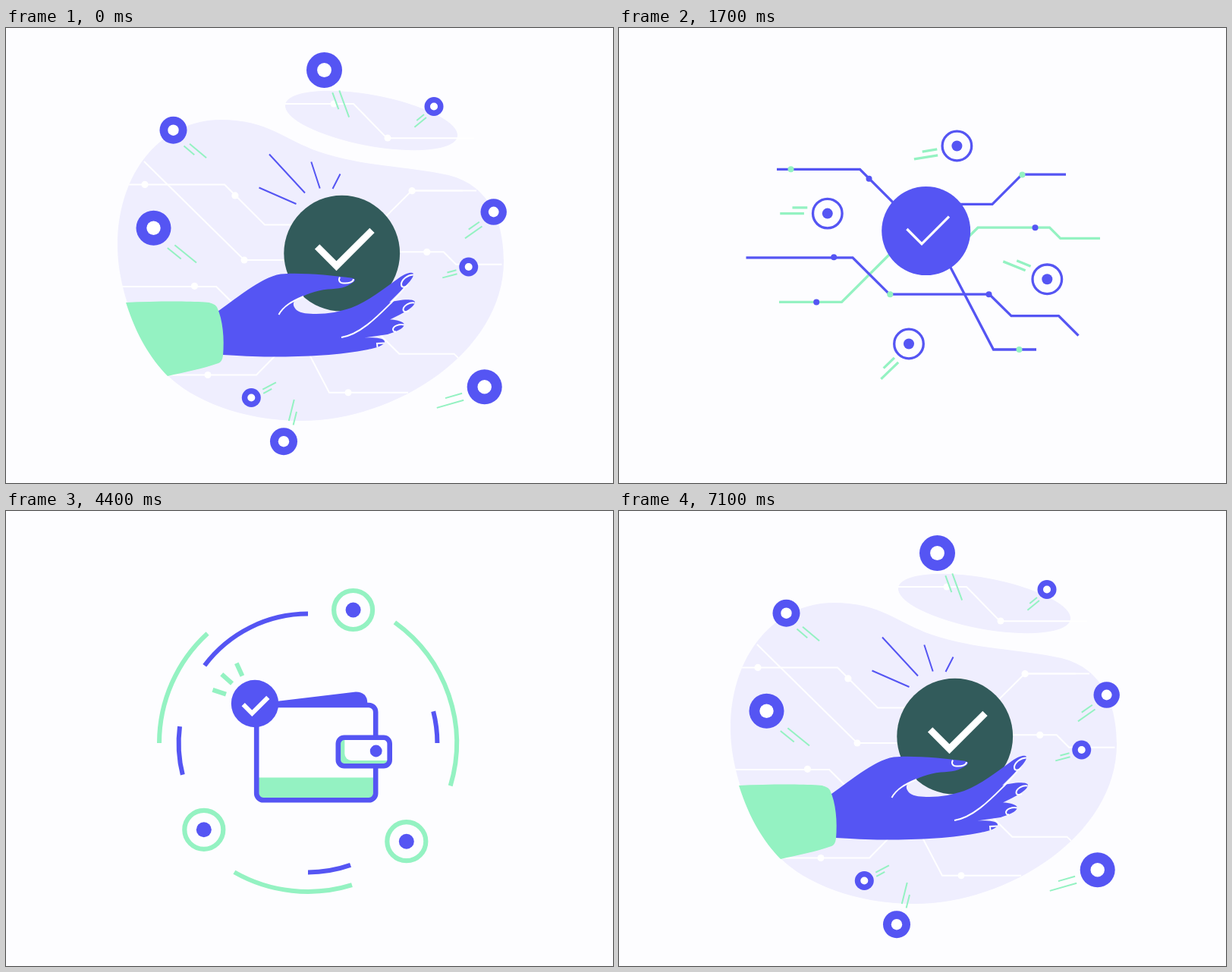
Animation, 800 px wide and 600 px high, one loop 8.1 s. Source, as an HTML page with a canvas:

```html
<!DOCTYPE html>
<html lang="en">
<head>
<meta charset="utf-8">
<title>Coins, network, wallet</title>
<style>
html, body { margin: 0; width: 100%; height: 100%; overflow: hidden; background: #fdfdff; }
canvas { display: block; }
</style>
</head>
<body>
<canvas id="stage" width="800" height="600"></canvas>
<script>
const W = 800, H = 600, DEG = Math.PI / 180;
const PAPER = '#fdfdff', BLUE = '#5555f3', GREEN = '#94f2c2',
      HAZE = '#efeefe', DARK = '#325b5b', WHITE = '#fff';

let g;

function scene(draw) {
  const layer = document.createElement('canvas');
  layer.width = W;
  layer.height = H;
  g = layer.getContext('2d');
  g.fillStyle = PAPER;
  g.fillRect(0, 0, W, H);
  draw();
  return layer;
}

function fill(color, d) {
  g.fillStyle = color;
  g.fill(new Path2D(d));
}

function stroke(color, width, d) {
  g.strokeStyle = color;
  g.lineWidth = width;
  g.stroke(new Path2D(d));
}

function disc(color, x, y, r) {
  g.fillStyle = color;
  g.beginPath();
  g.arc(x, y, r, 0, 360 * DEG);
  g.fill();
}

function arc(color, width, x, y, r, from = 0, to = 360) {
  g.strokeStyle = color;
  g.lineWidth = width;
  g.beginPath();
  g.arc(x, y, r, from * DEG, to * DEG);
  g.stroke();
}

function box(x, y, w, h, r) {
  g.beginPath();
  g.roundRect(x, y, w, h, r);
}

// A tick whose long arm rises k times as far as the short one falls.
function tick(x, y, size, k, width) {
  stroke(WHITE, width, `M${x - size} ${y - size}l${size} ${size}l${size * k} ${-size * k}`);
}

// A short and a long streak behind a coin; shift moves the pair sideways.
function trail(x, y, r, angle, shift, width) {
  g.save();
  g.translate(x, y);
  g.rotate(angle * DEG);
  g.scale(r, r);
  const long = 1.36 + shift * 0.2;
  stroke(GREEN, width / r, `M1.34 ${shift * 0.39}h1M${long} ${(shift - 1) * 0.4}h1.6`);
  g.restore();
}

// Wires that run through both the network and the backdrop.
function trunk(width, blue, green) {
  stroke(blue, width, 'M208 186.3h109.5l46 46H492l39.2-39.1H589' +
    'M167.5 302.8H308l48.5 48.3H488l29 28.5h62.5l26 26');
  stroke(green, width, 'M459 277l14-13.8h94.5l14.2 14.2H634');
  disc(green, 226.5, 186.3, 4);
  disc(green, 531.5, 193.4, 4);
  disc(green, 357.3, 351.2, 4);
  disc(blue, 329.5, 198.8, 4);
  disc(blue, 548.5, 263.3, 4);
  disc(blue, 283.2, 302.2, 4);
  disc(blue, 487.5, 351.2, 4);
}

function backdrop() {
  const blob = 'M283 121C345 121 366 147 412 163C470 183 530 182 583 194C640 208 656 260 656 307' +
    'C656 428 512 518 390 518C310 518 245 490 213 458C180 425 147 350 147 287C147 190 205 121 283 121Z';
  const zoom = 1.1545;
  fill(HAZE, blob);
  g.fillStyle = HAZE;
  g.beginPath();
  g.ellipse(481.5, 122, 115.4, 33.5, 0.185, 0, 360 * DEG);
  g.fill();

  g.save();
  g.clip(new Path2D(blob));
  g.translate(-78.5, -8.6);
  g.scale(zoom, zoom);
  trunk(2 / zoom, WHITE, WHITE);
  g.restore();

  stroke(WHITE, 2, 'M368 100h90l44 45.3h115M182 176l132 130h56M535 214.5h85' +
    'M400 431l26 49.7h104M213 457.5h117l26-26.5');
  disc(WHITE, 432, 100, 4.5);
  disc(WHITE, 503, 145, 4.5);
  disc(WHITE, 314, 306, 4.5);
  disc(WHITE, 266, 457.5, 4.5);
  disc(WHITE, 451, 480.7, 4.5);
}

function hand() {
  fill(BLUE, 'M270 380C304 357 335 329 362 324.5C386 322 428 326 455 329.5C461 330.5 461 333 458 335' +
    'C449 342.5 438 344 424 344.5C408 346 393 352 381 359.5C377 363 379 368 383 372' +
    'C389 376.5 398 377 409 377C425 377 440 374 455 369C477 361 499 343 518 329.5' +
    'C526 323.5 535 321 537 324C538 329 529 338 521 346L505 362C515 359 536 356 539 361' +
    'C539 367 527 374 519 378L506 384.5C514 384.5 524 387 525 391C524 397 514 400 503 404' +
    'L472 408.5C482 408 497 408 499 413C499 419 487 422 477 424C438 432 385 434 340 433.5' +
    'C320 433 300 432 270 430Z');
  stroke(WHITE, 2, 'M359.5 378C366 366 378 360 392 354M442 408C467 404 490 380 508 362C515 355 521 348 525 343');
  stroke(WHITE, 2, 'M440 328.5C437.5 333 440 336.5 445 336.5C452 337 458 335 458 331' +
    'M537 325.5C530 325 521 332 521 338C521 343 526 342.5 530 339' +
    'M538.5 362.5C532 361 524 366 523.5 371C523.5 374.5 527 375 531 373' +
    'M525 391.5C518 390 511 393 510 397C510 400 512 401 514 400' +
    'M498.5 415.5L489 416L489.5 421');
}

function solidCoin(x, y, r, angle, shift) {
  trail(x, y, r, angle, shift, 2);
  disc(BLUE, x, y, r);
  disc(WHITE, x, y, r * 0.4);
}

function handScene() {
  backdrop();
  disc(DARK, 442.7, 297.2, 76.4);
  tick(435.5, 313.8, 25.4, 1.85, 9);
  hand();
  fill(GREEN, 'M158 362C195 360 240 360 262 361.5Q274 362 278 368C286 385 288 410 286 432' +
    'Q285 440 280 442C260 449 235 454 213 459C190 435 172 406 158 362Z');
  stroke(BLUE, 2, 'M333.5 210.5l49 21.5M347 166.5l47 51M402.3 176.5l11.4 35M440.5 192.5l-10 19.5');
  solidCoin(419.5, 55.5, 23.5, 70, 0);
  solidCoin(564, 103.5, 12.5, 141, 0);
  solidCoin(220.5, 134.7, 18, 40, 1);
  solidCoin(194.5, 263.7, 23, 39, 1);
  solidCoin(642.7, 242.5, 17.2, 145, 0);
  solidCoin(609.7, 315, 12.5, 165, 0);
  solidCoin(630.7, 473.3, 23, 164, 0);
  solidCoin(323.3, 487.5, 12.5, -28, 0.5);
  solidCoin(366, 545.2, 18, -76, 1);
}

function outlineCoin(x, y, angle, shift) {
  trail(x, y, 19.8, angle, shift, 3.3);
  arc(BLUE, 3.3, x, y, 19.3);
  disc(BLUE, x, y, 7);
}

function networkScene() {
  const w = 3.3;
  stroke(BLUE, w, 'M435 312l58.5 112H550');
  stroke(GREEN, w, 'M211 361.4h82.5l64.5-64.4');
  trunk(w, BLUE, GREEN);
  disc(GREEN, 527.5, 424, 4);
  disc(BLUE, 260.2, 361.4, 4);
  disc(BLUE, 404.7, 267.6, 58.5);
  tick(399, 284.6, 19.6, 1.835, w);
  outlineCoin(445.4, 155.5, 170.5, 0);
  outlineCoin(274.8, 244.6, 180, 1);
  outlineCoin(564.3, 331.3, 202, 1);
  outlineCoin(382, 416.5, 136, 0);
}

function greenCoin(x, y) {
  arc(GREEN, 6.2, x, y, 25.5);
  disc(BLUE, x, y, 10);
}

function wallet() {
  const body = [330.2, 256, 157, 125.2, 9];
  const clasp = [437.8, 298.8, 67.9, 37.4, 8];
  fill(BLUE, 'M350 258V251.8L461 238.6Q476 239 476.3 253V258Z');
  g.strokeStyle = BLUE;
  g.lineWidth = 6.6;

  box(...body);
  g.fillStyle = PAPER;
  g.fill();
  g.save();
  g.clip();
  g.fillStyle = GREEN;
  g.fillRect(330, 351.5, 158, 30);
  g.restore();
  g.stroke();

  box(...clasp);
  g.fillStyle = GREEN;
  g.fill();
  box(446.3, 299, 59, 30, [0, 0, 0, 9]);
  g.fillStyle = PAPER;
  g.fill();
  box(...clasp);
  g.stroke();
  disc(BLUE, 487.7, 316.5, 7.9);
}

function badge(x, y) {
  disc(BLUE, x, y, 31.2);
  tick(x - 3.7, y + 12.8, 11.6, 1.81, 6);
  for (const angle of [198, 221.5, 245.5]) {
    const c = Math.cos(angle * DEG), s = Math.sin(angle * DEG);
    stroke(GREEN, 6, `M${x + 40 * c} ${y + 40 * s}L${x + 58.4 * c} ${y + 58.4 * s}`);
  }
}

function walletScene() {
  const outer = (from, to) => arc(GREEN, 6, 398, 306, 196, from, to);
  const inner = (from, to) => arc(BLUE, 6, 398, 306, 170.4, from, to);
  outer(-54.3, 16.7);
  outer(72.8, 119.7);
  outer(180, 227.5);
  inner(-14.2, 0);
  inner(70.8, 90);
  inner(165.8, 187.4);
  inner(216.9, 270);
  greenCoin(457.6, 130.5);
  greenCoin(260.8, 420.3);
  greenCoin(527.8, 435.7);
  wallet();
  badge(328, 254);
}

const scenes = [handScene, networkScene, walletScene].map(scene);
const view = document.getElementById('stage').getContext('2d');
const LOOP = 8100, CYCLE = LOOP / scenes.length, HOLD = 1000, STEP = 100, STEPS = 8;

function frame() {
  const t = performance.now() % LOOP;
  const i = Math.floor(t / CYCLE);
  const step = Math.floor((t - i * CYCLE - HOLD) / STEP) + 1;
  view.globalAlpha = 1;
  view.drawImage(scenes[i], 0, 0);
  view.globalAlpha = Math.min(Math.max(step / STEPS, 0), 1);
  view.drawImage(scenes[(i + 1) % scenes.length], 0, 0);
  requestAnimationFrame(frame);
}
frame();
</script>
</body>
</html>
```
